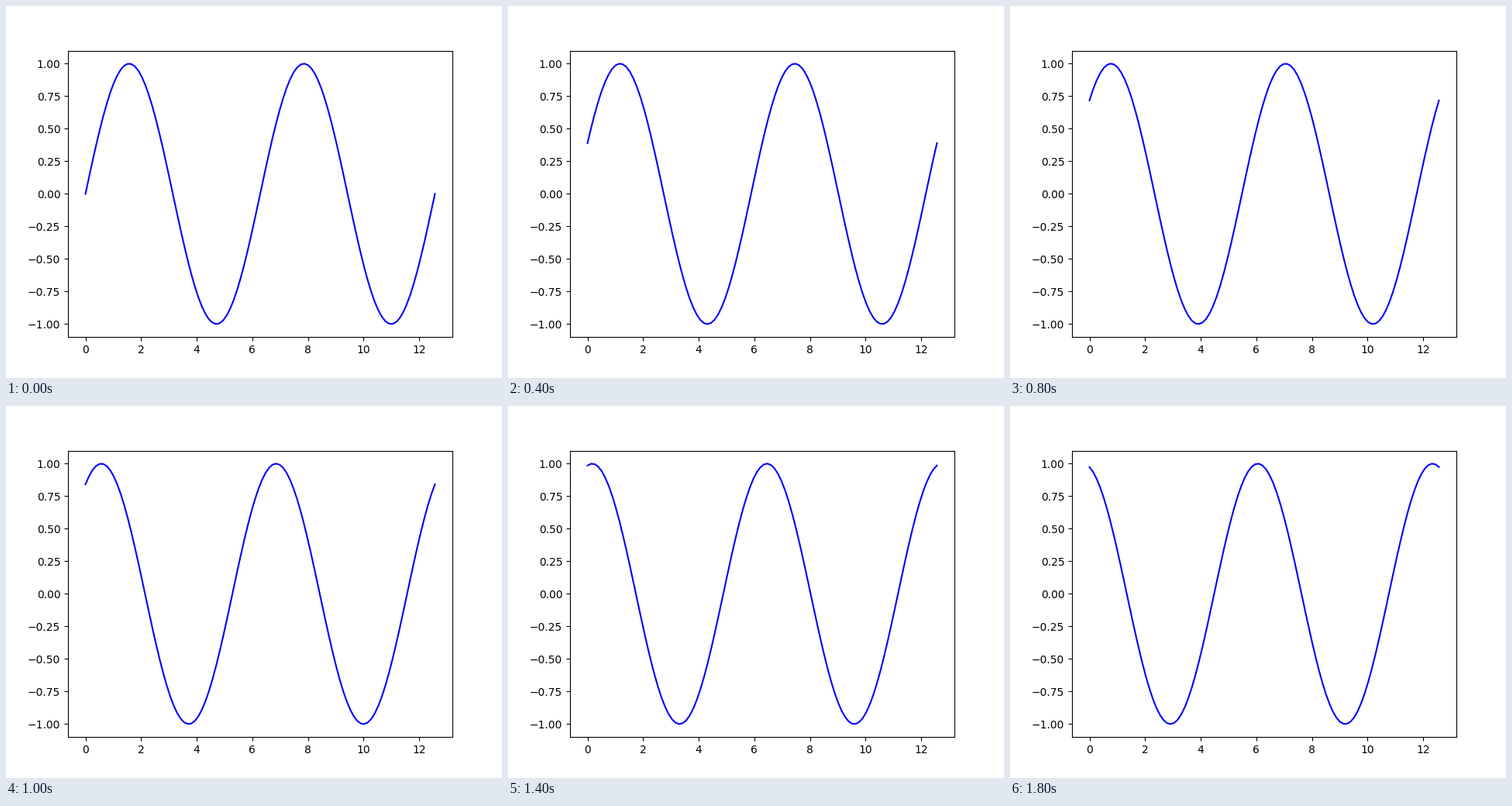
Recreate the animation shown at these times as a matplotlib script. Size 640x480 px, loop 2 s.

```python
import matplotlib.pyplot as plt
import numpy as np
from matplotlib.animation import FuncAnimation

FRAMES = 10
INTERVAL = 200      # ms per frame
PHASE_STEP = 0.2    # radians the wave shifts per frame

fig, ax = plt.subplots(figsize=(6.4, 4.8), dpi=100)
x = np.linspace(0, 4 * np.pi, 100)
line, = ax.plot(x, np.sin(x), color="b", linewidth=1.5)


def update(i):
    line.set_ydata(np.sin(x + PHASE_STEP * i))
    return line,


anim = FuncAnimation(fig, update, frames=FRAMES, interval=INTERVAL,
                     repeat=True, repeat_delay=0)
plt.show()
```
